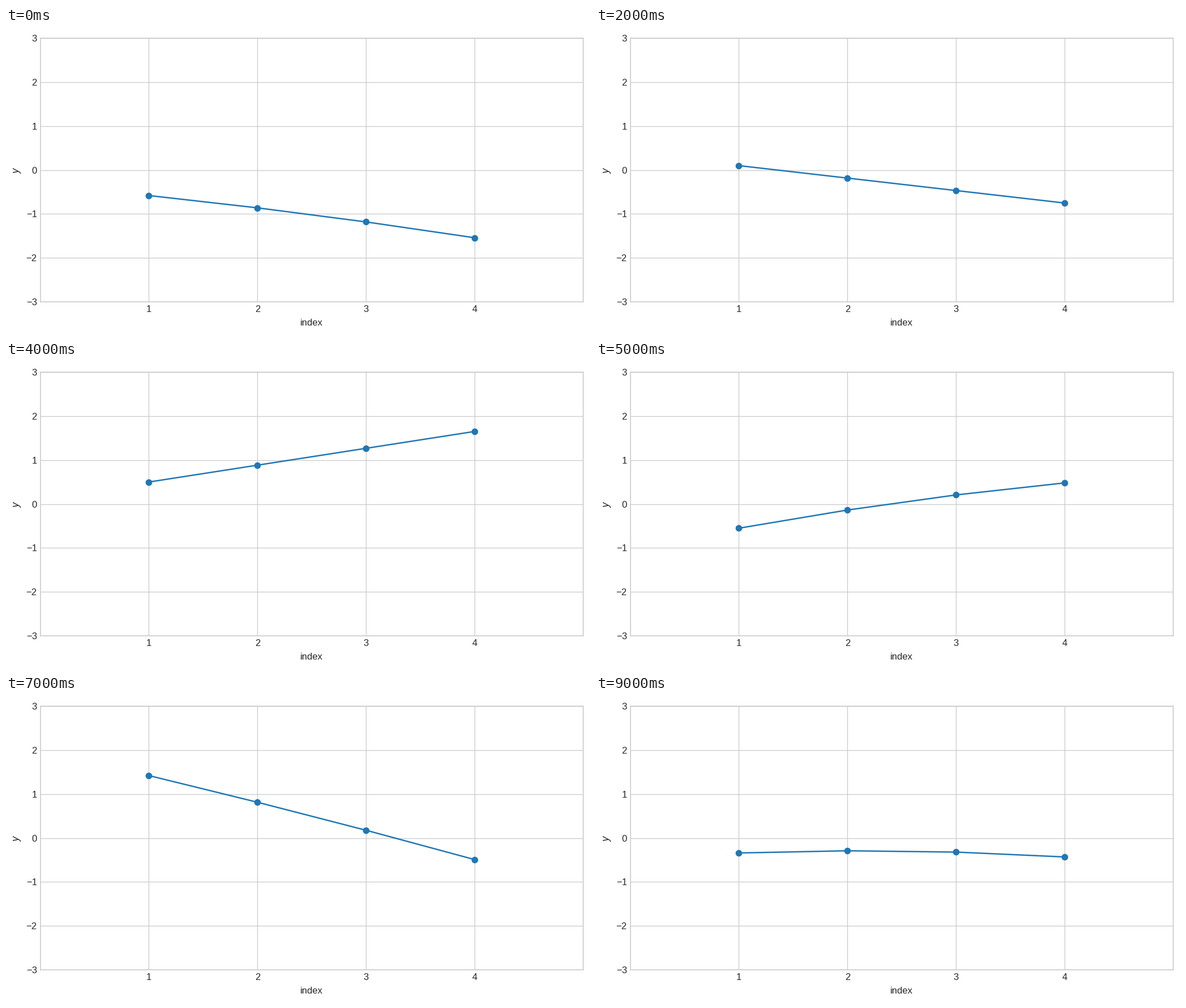
These frames come from a looping animation (1032x542 px, 10 s). A matplotlib script:

```python
import numpy as np
import matplotlib.pyplot as plt
from matplotlib.animation import FuncAnimation

W, H, DPI = 1032, 542, 120
LEFT, RIGHT, TOP, BOTTOM = 60.55, 1020.0, 17.85, 485.25
GRID, TEXT, BLUE = "0.8", "0.15", "#1f77b4"

# Each curve: first value, last value, lift of the middle
CURVES = [
    (-0.58, -1.54, 0.04), (0.18, 0.55, -0.18), (0.10, -0.75, 0),
    (0.65, -1.80, 0.07), (0.50, 1.65, 0), (-0.55, 0.48, 0.07),
    (-0.57, 1.54, 0), (1.42, -0.49, 0.03), (0.58, -2.21, -0.19),
    (-0.34, -0.43, 0.08),
]
INDEX = np.arange(1, 5)

plt.rcParams.update({
    "font.family": "Liberation Sans",
    "font.size": 10,
    "axes.edgecolor": GRID,
    "axes.linewidth": 1,
    "axes.labelcolor": TEXT,
    "axes.axisbelow": True,
    "grid.color": GRID,
    "grid.linewidth": 0.8,
    "xtick.color": TEXT,
    "ytick.color": TEXT,
    "xtick.major.size": 0,
    "ytick.major.size": 0,
    "lines.solid_capstyle": "round",
})


def curve(first, last, lift):
    """Straight run from first to last, bowed by a parabola."""
    u = (INDEX - 1) / 3
    return first + (last - first) * u + lift * 4.5 * u * (1 - u)


fig = plt.figure(figsize=(W / DPI, H / DPI), dpi=DPI, facecolor="white")
ax = fig.add_axes([LEFT / W, 1 - BOTTOM / H, (RIGHT - LEFT) / W, (BOTTOM - TOP) / H])
ax.set(xlim=(0, 5), ylim=(-3, 3), xticks=INDEX, yticks=range(-3, 4))
ax.set_xlabel("index", labelpad=5.2)
ax.set_ylabel("$y$")
ax.grid(True)
line, = ax.plot(INDEX, curve(*CURVES[0]), "o-", color=BLUE, lw=1.5, ms=6)


def update(i):
    line.set_ydata(curve(*CURVES[i]))
    return line,


anim = FuncAnimation(fig, update, frames=len(CURVES), interval=1000,
                     repeat=True, repeat_delay=0)
plt.show()
```
